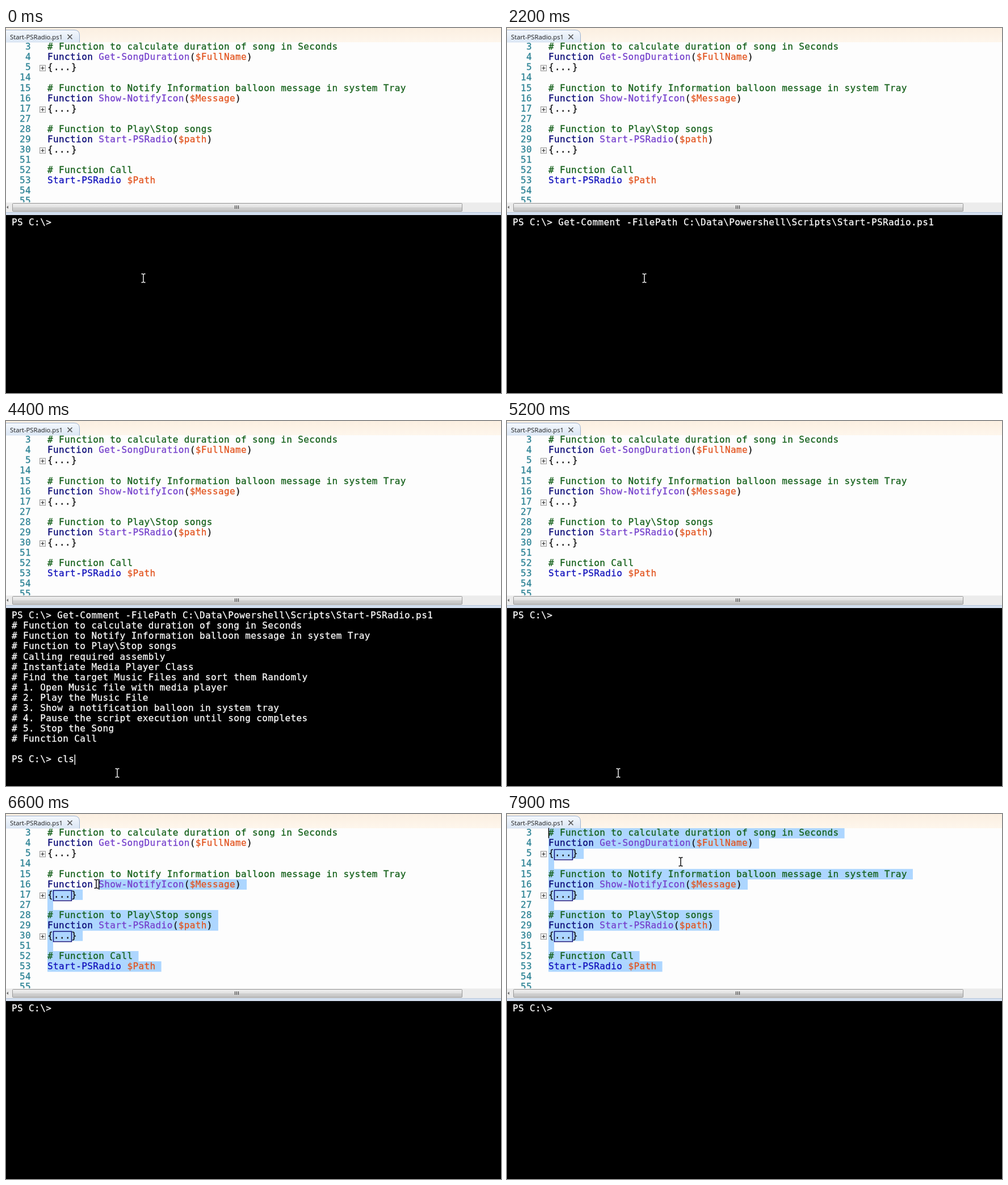
An HTML page for the animation above (8 s loop, 872x642 px).

```html
<!DOCTYPE html>
<html lang="en">
<head>
<meta charset="utf-8">
<title>Script editor and console</title>
<style>
html, body { margin: 0; width: 100%; height: 100%; overflow: hidden; background: #000; }
svg { display: block; width: 872px; height: 642px; }
text { white-space: pre; }
.code text { font: 16px "DejaVu Sans Mono", monospace; letter-spacing: .397px; }
.code tspan { stroke-width: .3px; }
.tab { font: 11.25px "Open Sans", sans-serif; fill: #1c1c1c; }
</style>
</head>
<body>
<svg viewBox="0 0 872 642" xmlns="http://www.w3.org/2000/svg">
  <defs>
    <linearGradient id="thumb" x2="0" y2="1">
      <stop offset="0" stop-color="#f0f0f0"/><stop offset=".45" stop-color="#e2e2e2"/>
      <stop offset=".55" stop-color="#cfcfcf"/><stop offset="1" stop-color="#c4c4c4"/>
    </linearGradient>
    <linearGradient id="tabFill" x2="0" y2="1">
      <stop offset="0" stop-color="#f4f8fd"/><stop offset="1" stop-color="#dbe6f4"/>
    </linearGradient>
    <linearGradient id="strip" x2="0" y2="1">
      <stop offset="0" stop-color="#fbefe1"/><stop offset="1" stop-color="#fef6ec"/>
    </linearGradient>
    <clipPath id="page"><rect y="25" width="872" height="281.5"/></clipPath>
  </defs>
  <rect width="872" height="330" fill="#fdfdfd"/>
  <rect width="872" height="25" fill="url(#strip)"/>
  <path d="M-1 25.5V3.5H120Q129.500 3.500 129.500 13V25.500" fill="url(#tabFill)" stroke="#9db2cf"/>
  <text class="tab" x="7" y="19.500">Start-PSRadio.ps1</text>
  <path d="M108.500 11.500l8 8m0-8l-8 8" stroke="#555" stroke-width="1.700"/>
  <g clip-path="url(#page)" class="code">
    <g id="marks"></g>
    <g id="lines"></g>
    <g id="frames"></g>
  </g>
  <rect y="307" width="872" height="17" fill="#ececec"/>
  <path d="M4 312.500v5.500l-3-2.750z" fill="#666"/>
  <rect x="11.500" y="308.500" width="792" height="14" rx="1" fill="url(#thumb)" stroke="#979797"/>
  <path d="M403.500 312v6m3-6v6m3-6v6" stroke="#444" stroke-width="1.200"/>
  <rect y="324" width="872" height="5" fill="#d5e1f1"/>
  <rect y="324" width="872" height="1" fill="#b4c5dc"/>
  <rect y="329" width="872" height="313" fill="#000"/>
  <g id="term" class="code"></g>
  <path id="caret" fill="none" stroke-width="1.500"/>
  <path id="beam" fill="none" stroke-width="1.400"
    d="M-3.500-7.500H-1.500L0-6.500L1.500-7.500H3.500M0-6.500V6.500M-3.500 7.500H-1.500L0 6.500L1.500 7.500H3.500"/>
</svg>
<script>
const LOOP = 8000, STEP = 100, CW = 10.03, RH = 18.05, LEFT = 73, TOP = 24.5;
const $ = id => document.getElementById(id);
const raw = String.raw;

// A leading letter on each token picks its colour.
const ink = {
  c: '#14601a', k: '#0b0b78', f: '#7540cc', p: '#111', v: '#e2541f', s: '#1212bc',
  w: '#fafafa', g: '#e4fbfb', m: '#ffe9c0', q: '#e68be6', n: '#2f8496'
};
const fold = 'p{...}';
const source = [
  [3, 'c# Function to calculate duration of song in Seconds'],
  [4, 'kFunction |fGet-SongDuration|p(|v$FullName|p)'],
  [5, fold],
  [14, ''],
  [15, 'c# Function to Notify Information balloon message in system Tray'],
  [16, 'kFunction |fShow-NotifyIcon|p(|v$Message|p)'],
  [17, fold],
  [27, ''],
  [28, raw`c# Function to Play\Stop songs`],
  [29, 'kFunction |fStart-PSRadio|p(|v$path|p)'],
  [30, fold],
  [51, ''],
  [52, 'c# Function Call'],
  [53, 'sStart-PSRadio |v$Path'],
  [54, ''],
  [55, '']
];
const prompt = raw`PS C:\> `;
const path = raw`C:\Data\Powershell\Scripts\Start-PSRadio.ps1`;
const colored = `w${prompt}|gGet-Comment |m-FilePath |q${path}`;
const plain = `w${prompt}Get-Comment -FilePath ${path}`;
const output = raw`Function to calculate duration of song in Seconds
Function to Notify Information balloon message in system Tray
Function to Play\Stop songs
Calling required assembly
Instantiate Media Player Class
Find the target Music Files and sort them Randomly
1. Open Music file with media player
2. Play the Music File
3. Show a notification balloon in system tray
4. Pause the script execution until song completes
5. Stop the Song
Function Call`.split('\n').map(s => 'w# ' + s);

// time, x, y of the pointer
const route = [
  [0, 242, 440], [2700, 242, 440], [2800, 246, 452], [3300, 199, 596], [3400, 199, 596],
  [3600, 196, 619], [5300, 196, 619], [5600, 300, 470], [5900, 430, 255], [6000, 425, 248],
  [6200, 290, 285], [6300, 270, 286], [6400, 235, 240], [6600, 159, 123], [6700, 152, 120],
  [6800, 152, 120], [6900, 140, 106], [7400, 74, 50], [7500, 74, 50], [7600, 73, 33],
  [7700, 150, 62], [7900, 306, 84], [8000, 306, 84]
];
const caretOn = [[400, 900], [1100, 1600], [2100, 2200], [2400, 2800], [3300, 3900], [4100, 5200], [5700, 6200]];
const DRAG = 6300, RELEASE = 7600;

const line = (x, y, tokens) => `<text x="${x}" y="${y}">` + tokens.split('|')
  .map(s => `<tspan fill="${ink[s[0]]}" stroke="${ink[s[0]]}">${s.slice(1).replace('>', '&gt;')}</tspan>`)
  .join('') + '</text>';
const rect = (x, y, w, h, look) => `<rect x="${x}" y="${y}" width="${w}" height="${h}" ${look}/>`;
const tokenLen = s => s ? s.split('|').reduce((n, part) => n + part.length - 1, 0) : 0;
const baseline = (first, i) => Math.round(first + i * RH);

function drawSource() {
  $('lines').innerHTML = source.map(([num, code], i) => {
    const y = baseline(38.3, i), label = String(num);
    let out = line(44 - label.length * CW, y, 'n' + label);
    if (code === fold) {
      const by = y - 8.5;
      out += rect(59.5, by, 10, 10, 'fill="#f2f2f2" stroke="#989898"') +
        `<path d="M61.500 ${by + 5}h6m-3-3v6" stroke="#333" stroke-width="1.200"/>` +
        line(LEFT, y, 'p{') + line(LEFT + CW + 1, y, 'p...') + line(LEFT + 4 * CW + 2, y, 'p}');
    } else if (code) out += line(LEFT, y, code);
    return out;
  }).join('');
}

function pointer(t) {
  const i = Math.max(1, route.findIndex(p => p[0] >= t));
  const [t0, x0, y0] = route[i - 1], [t1, x1, y1] = route[i];
  const k = (t - t0) / (t1 - t0);
  return [x0 + (x1 - x0) * k, y0 + (y1 - y0) * k];
}

// Selects from the place under the pointer down to the end of line 53.
function select(t) {
  if (t < DRAG) { $('marks').innerHTML = $('frames').innerHTML = ''; return null; }
  const [x, y] = pointer(Math.min(t, RELEASE));
  const row = Math.floor((y - TOP) / RH);
  const col = Math.max(0, Math.min(tokenLen(source[row][1]), Math.round((x - LEFT) / CW)));
  let marks = '', frames = '';
  for (let i = row; i < 14; i++) {
    const code = source[i][1], folded = code === fold, top = TOP + i * RH;
    const x0 = LEFT + (i === row ? col * CW : 0);
    const x1 = LEFT + (tokenLen(code) + 1) * CW + (folded ? 2 : 0);
    marks += rect(x0, top, x1 - x0, RH + .3, 'fill="#add6ff"');
    if (folded) frames += rect(83.5, Math.round(top + 1) + .5, 32, 18, 'fill="none" stroke="#10107c" stroke-width="1.500"');
  }
  $('marks').innerHTML = marks;
  $('frames').innerHTML = frames;
  return [LEFT + col * CW + .5, TOP + row * RH];
}

function terminal(t) {
  if (t < 1100 || t >= 4600) return ['w' + prompt];
  if (t < 2200) return [t < 1200 ? plain : colored];
  if (t < 2300) return [plain];
  const rows = [plain, ...output];
  if (t >= 2400) {
    const typed = t < 4100 ? 0 : (t - 4100) / STEP + 1;
    rows.push('', 'w' + prompt + 'cls'.slice(0, typed));
  }
  return rows;
}

function draw(t) {
  const rows = terminal(t);
  $('term').innerHTML = rows.map((s, i) => s ? line(10, baseline(347.3, i), s) : '').join('');

  let spot = select(t), shade = '#000';
  if (!spot && caretOn.some(([a, b]) => t >= a && t < b)) {
    const last = rows.length - 1;
    spot = [11 + tokenLen(rows[last]) * CW, 334 + last * RH];
    shade = '#fff';
  }
  $('caret').setAttribute('d', spot ? `M${spot[0]} ${spot[1]}v18` : '');
  $('caret').setAttribute('stroke', shade);

  const [x, y] = pointer(t);
  $('beam').setAttribute('transform', `translate(${x} ${y})`);
  $('beam').setAttribute('stroke', y > 330 ? '#fff' : '#000');
}

drawSource();
const start = performance.now();
let shown = -1;
function tick() {
  const t = Math.floor(((performance.now() - start) % LOOP) / STEP) * STEP;
  if (t !== shown) draw(shown = t);
  requestAnimationFrame(tick);
}
tick();
</script>
</body>
</html>
```
